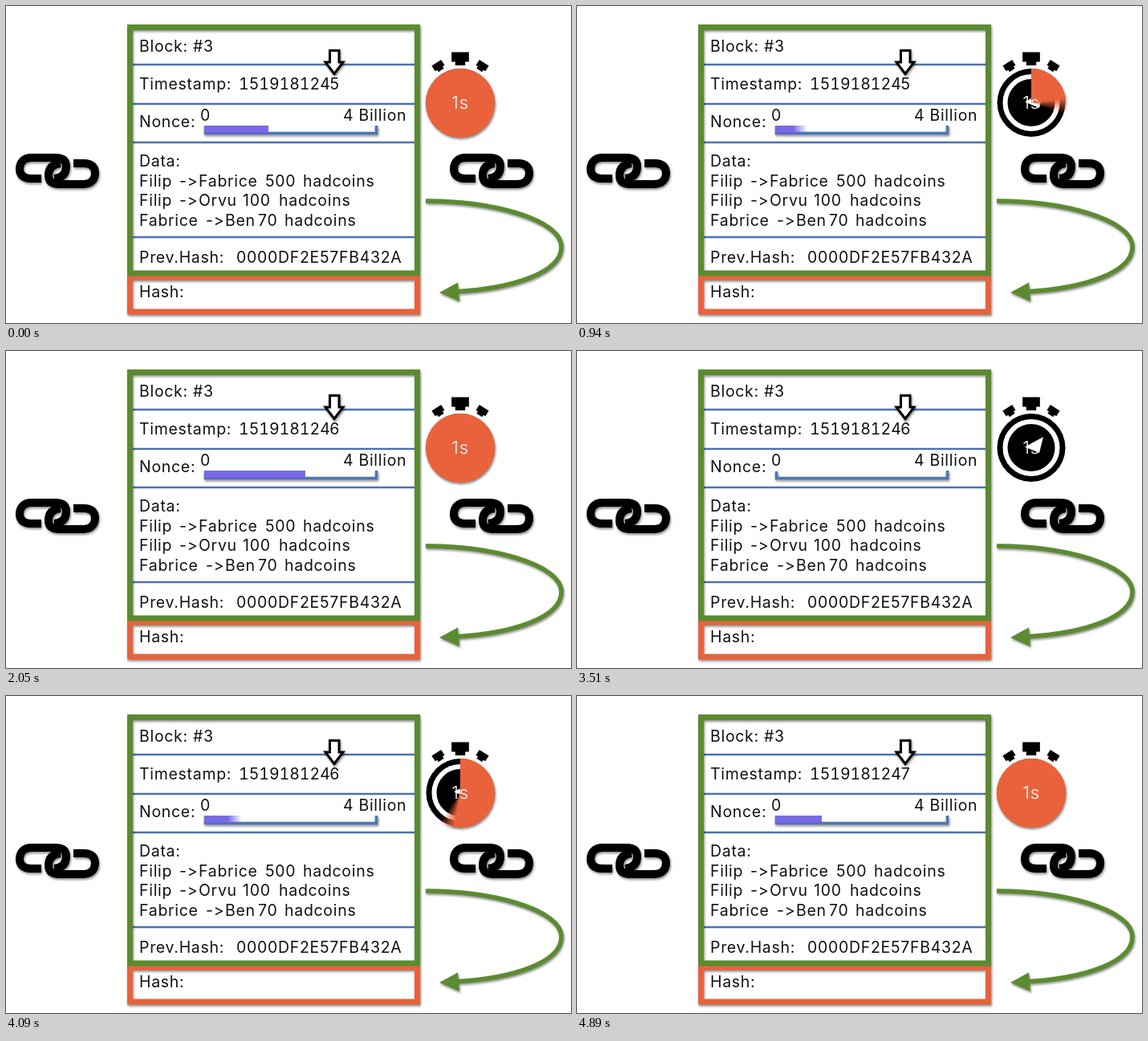
Write an HTML page that moves like this. It is 704x395 px and loops after 8000 ms.

```html
<!DOCTYPE html>
<html lang="en">
<head>
<meta charset="utf-8">
<title>Block mining</title>
<style>
@property --angle { syntax: "<angle>"; inherits: false; initial-value: 374deg; }
@property --edge { syntax: "<length>"; inherits: false; initial-value: 101px; }

html, body { margin: 0; width: 100%; height: 100%; overflow: hidden; background: #fff; }
body { position: relative; }
svg { position: absolute; left: 0; top: 0; display: block; }
text { font: 400 19.5px Inter, "Open Sans", sans-serif; letter-spacing: .7px; fill: #111; }
.digits { font-variant-numeric: tabular-nums; letter-spacing: 0; }
.shadow { filter: drop-shadow(1.5px 2.5px 1.5px #0007); }
.light { fill: #fff; font-weight: 300; font-size: 22px; }

.disc, .bar, .digit { animation: 8s linear infinite; }
.disc {
  position: absolute; left: 506px; top: 61px; width: 120px; height: 120px;
  mask-image: conic-gradient(#000 calc(var(--angle) - 14deg), transparent calc(var(--angle) + 14deg));
  animation-name: wheel;
}
.bar {
  position: absolute; left: 247px; top: 149px; width: 80px; height: 10px;
  background: linear-gradient(#766be4 75%, #6259c9);
  mask-image: linear-gradient(90deg, #000 calc(var(--edge) - 9px), transparent calc(var(--edge) + 9px));
  animation-name: fill;
}
.d5 { animation-name: five; }
.d6 { animation-name: six; }
.d7 { animation-name: seven; }

@keyframes wheel {
  0%, 6.25% { --angle: 374deg; opacity: 1; }
  7.75% { --angle: 374deg; opacity: 0; }
  7.76%, 8.25% { --angle: -14deg; opacity: 1; }
  20.75%, 43.87% { --angle: 374deg; }
  43.875%, 44.125% { --angle: -14deg; }
  56.625%, 100% { --angle: 374deg; opacity: 1; }
}
@keyframes fill {
  0%, 6.25% { width: 80px; --edge: 101px; opacity: 1; }
  7.75% { width: 80px; --edge: 101px; opacity: 0; }
  7.76%, 8.25% { width: 126px; --edge: -14px; opacity: 1; }
  20.75%, 43.87% { width: 126px; --edge: 147px; }
  43.875%, 44.125% { width: 58px; --edge: -14px; }
  56.625%, 100% { width: 58px; --edge: 79px; opacity: 1; }
}
@keyframes five { 0%, 20.75% { opacity: 1; } 25.6%, 100% { opacity: 0; } }
@keyframes six { 0%, 20.75% { opacity: 0; } 25.6%, 56.625% { opacity: 1; } 61.1%, 100% { opacity: 0; } }
@keyframes seven { 0%, 56.625% { opacity: 0; } 61.1%, 100% { opacity: 1; } }
</style>
</head>
<body>
<svg width="704" height="395" viewBox="0 0 704 395">
  <defs>
    <g id="chain" fill="none" stroke="#000" stroke-width="10">
      <path d="M84 196H97C107 196 111 201 111 208C111 216 106 222 96 222H67C57 222 53 218 53 211C53 202 58 197 68 196"/>
      <path d="M44 215H31C21 215 17 210 17 203C17 195 22 189 32 189H61C71 189 75 193 75 200C75 209 70 214 60 215"/>
    </g>
    <path id="knob" d="M-7-5H7V3H4V6H-4V3H-7Z"/>
  </defs>

  <path d="M158 73H509M158 122H509M158 170H509M158 288H509" stroke="#4a72b5" stroke-width="2.6"/>
  <g fill="none" stroke-width="7" class="shadow">
    <rect x="154.5" y="338" width="358" height="43" stroke="#e9623b"/>
    <rect x="154.5" y="26.5" width="358" height="306.5" stroke="#5b8b30"/>
  </g>

  <use href="#chain" class="shadow"/>
  <use href="#chain" x="541" class="shadow"/>

  <g class="shadow">
    <path d="M523 243C600 242 692 265 692 300C692 331 635 352 558 356" fill="none" stroke="#5b8b30" stroke-width="5.5"/>
    <path d="M540 357L563 344.5L565 368Z" fill="#5b8b30"/>
  </g>

  <path d="M403.5 55.5H415V70H420L409 84.5L398 70H403.5Z" fill="#fff" stroke="#000" stroke-width="3" class="shadow"/>

  <path d="M248.5 150V158.5H461.5V149" fill="none" stroke="#4a78b5" stroke-width="3.6" class="shadow"/>

  <use href="#knob" transform="translate(566 65) scale(1.55 1.5)"/>
  <use href="#knob" transform="translate(539 75) rotate(-33)"/>
  <use href="#knob" transform="translate(593 75) rotate(33)"/>
  <circle cx="566" cy="120.5" r="42.5"/>
  <circle cx="566" cy="120.5" r="32.5" fill="none" stroke="#fff" stroke-width="6"/>
  <path d="M558 119.5L581 107L576 127Z" fill="#fff"/>
</svg>

<div class="disc">
  <svg width="120" height="120"><circle cx="60" cy="60" r="43.3" fill="#e9623b" class="shadow"/></svg>
</div>
<div class="bar"></div>

<svg width="704" height="395" viewBox="0 0 704 395">
  <text x="166" y="57">Block: #3</text>
  <text x="166" y="104">Timestamp:</text>
  <g class="stamp">
    <text x="290" y="104" class="digits">151918124</text>
    <text x="403" y="104" class="digits digit d5">5</text>
    <text x="403" y="104" class="digits digit d6">6</text>
    <text x="403" y="104" class="digits digit d7">7</text>
  </g>
  <text x="166" y="151">Nonce:</text>
  <text x="242" y="142.5">0</text>
  <text x="420" y="142.5">4 Billion</text>
  <text x="166" y="200">Data:</text>
  <text y="224.5"><tspan x="166">Filip</tspan><tspan x="216">-&gt;</tspan><tspan x="240">Fabrice</tspan><tspan x="323">500</tspan><tspan x="370">hadcoins</tspan></text>
  <text y="249"><tspan x="166">Filip</tspan><tspan x="216">-&gt;</tspan><tspan x="240">Orvu</tspan><tspan x="295">100</tspan><tspan x="340">hadcoins</tspan></text>
  <text y="274"><tspan x="166">Fabrice</tspan><tspan x="249">-&gt;</tspan><tspan x="273">Ben</tspan><tspan x="314">70</tspan><tspan x="347">hadcoins</tspan></text>
  <text x="166" y="320">Prev.Hash:</text>
  <text x="287" y="320">0000DF2E57FB432A</text>
  <text x="166" y="363">Hash:</text>
  <text x="566" y="127.5" text-anchor="middle" class="light">1s</text>
</svg>
</body>
</html>
```
